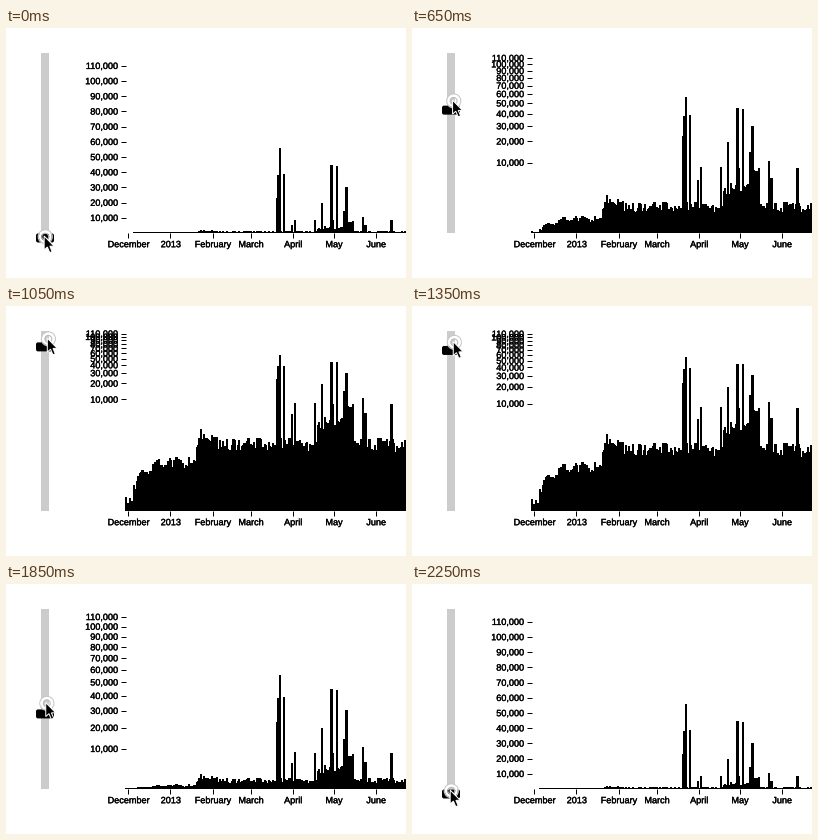
These frames come from a looping animation (400x250 px, 2.3 s). A matplotlib script:

```python
import numpy as np
import matplotlib.pyplot as plt
from matplotlib import patheffects
from matplotlib.animation import FuncAnimation
from matplotlib.patches import Circle, FancyBboxPatch, Polygon, Rectangle

WIDTH, HEIGHT, DPI = 400, 250, 100
PX = 72 / DPI
FRAMES, INTERVAL = 46, 50
BASE, SPAN, PEAK = 205, 180, 118.4  # PEAK in thousands
DAY0, DAY_WIDTH = 122.2, 1.36

plt.rcParams.update({
    "font.family": "Liberation Sans", "font.size": 9.1 * PX,
    "text.hinting": "none", "toolbar": "None",
    "lines.solid_capstyle": "butt", "lines.linewidth": PX,
})


def daily_values(days):
    """Daily counts as fractions of the peak: a noisy outline plus spikes."""
    rng = np.random.default_rng(7)
    outline_x = [120, 126, 131, 150, 189, 195, 215, 310, 312, 336, 342, 400]
    outline_y = [189, 199, 171, 160, 156, 128, 138, 139, 117, 117, 137, 140]
    top = np.interp(DAY0 + (days + 0.5) * DAY_WIDTH, outline_x, outline_y)
    top += rng.uniform(-7, 7, days.size)
    values = ((BASE - top) / SPAN) ** (1 / 0.192)

    small = rng.choice(np.arange(120, 175), 8, replace=False)
    spikes = dict(zip(small, rng.uniform(4, 9, small.size)))
    spikes |= {109: 23, 110: 38, 111: 55.6, 114: 38.5, 142: 19.5, 149: 44.5,
               153: 43.5, 158: 14, 160: 30, 172: 10.5, 193: 8}
    for day, thousands in spikes.items():
        values[days == day] = thousands / PEAK
    return values


def pointer_height(t):
    """Steady drag up, a soft stop near the top, and the same way down."""
    floor, softness = 32, 18
    line = 0.219 * abs(t - 1140) - 36
    return min(209, floor + softness * np.logaddexp(0, (line - floor) / softness))


def add_text(x, y, text, align):
    outline = patheffects.withStroke(linewidth=0.25, foreground="black")
    return ax.text(x, y, text, ha=align, va="baseline", path_effects=[outline])


def add_ring(radius, color, width):
    return Circle((0, 0), radius, fill=False, ec=color, lw=width * PX)


fig = plt.figure(figsize=(WIDTH / DPI, HEIGHT / DPI), dpi=DPI, facecolor="white")
ax = fig.add_axes([0, 0, 1, 1])
ax.axis("off")

days = np.arange(-2, 206)
values = daily_values(days)
edges = DAY0 + np.append(days, days[-1] + 1) * DAY_WIDTH
bars = ax.stairs(BASE - SPAN * values, edges, baseline=BASE, fill=True,
                 color="black", lw=0.6 * PX, antialiased=False, snap=False)

months = ["December", "2013", "February", "March", "April", "May", "June"]
month_starts = np.cumsum([0, 31, 31, 28, 31, 30, 31])
for name, start in zip(months, month_starts):
    x = DAY0 + start * DAY_WIDTH
    ax.plot([x, x], [BASE, BASE + 5], color="black")
    add_text(x + 0.5, 219.2, name, "center")

levels = np.arange(10, 120, 10)
ticks = [ax.plot([115, 120], [0, 0], color="black")[0] for _ in levels]
labels = [add_text(112.2, 0, f"{k},000", "right") for k in levels]

ax.add_patch(Rectangle((35, 25), 8, 180, color="#cccccc", lw=0))
handle = FancyBboxPatch((30, 0), 18, 9, fc="black", lw=0,
                        boxstyle="round,pad=0,rounding_size=2")
rings = [add_ring(7, "#c8c8c8", 1.2), add_ring(5.2, "white", 2.4),
         add_ring(3.4, "#b8b8b8", 1)]
arrow_shape = np.array([(0, 0), (0, 14), (3.2, 11), (5.6, 16.6), (8, 15.6),
                        (5.7, 10.2), (10, 10.2)])
arrow = Polygon(arrow_shape, fc="black", ec="white", lw=PX, joinstyle="miter")
for z, patch in enumerate([handle, *rings, arrow], 5):
    patch.set_zorder(z)
    ax.add_patch(patch)

ax.set_xlim(0, WIDTH)
ax.set_ylim(HEIGHT, 0)


def update(frame):
    y = pointer_height(frame * INTERVAL)
    x = 42.5 - 0.018 * y
    exponent = min(1, np.hypot(0.005 * y, 0.1))

    bars.set_data(values=BASE - SPAN * values ** exponent)
    for k, tick, label in zip(levels, ticks, labels):
        level = BASE - SPAN * (k / PEAK) ** exponent
        tick.set_ydata([level, level])
        label.set_y(level + 3.2)

    handle.set_y(min(210, 1.03 * y + 6.7) - 4.5)
    for ring in rings:
        ring.center = (x + 0.5, y - 0.3)
    arrow.set_xy(arrow_shape + (x - 0.6, y - 1))
    return [bars, *ticks, *labels, handle, *rings, arrow]


anim = FuncAnimation(fig, update, frames=FRAMES, interval=INTERVAL,
                     repeat=True, repeat_delay=0, blit=False)
plt.show()
```
